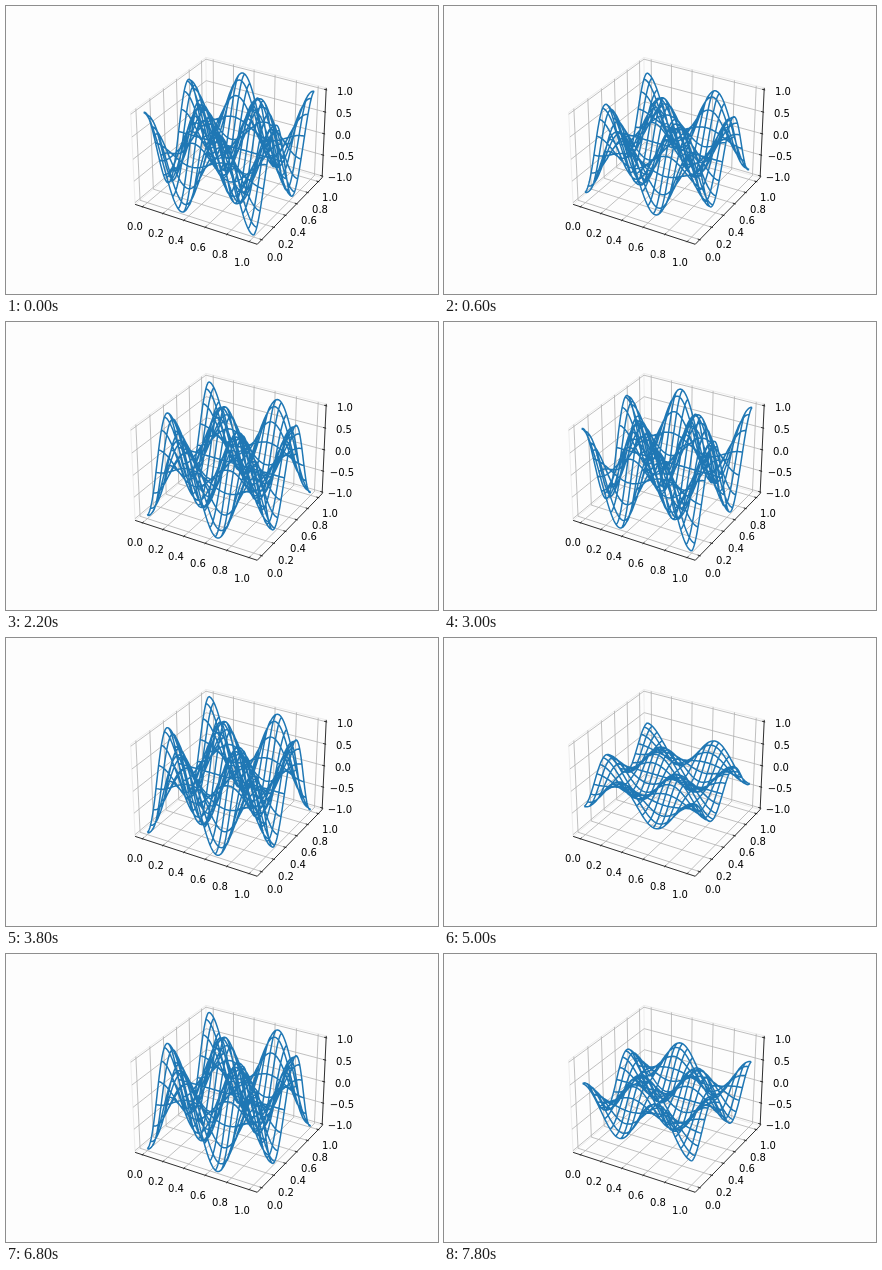
Animation of 432x288 px, one loop 8 s. Source, as an HTML page:

```html
<!DOCTYPE html>
<html lang="en">
<head>
<meta charset="utf-8">
<title>Standing wave</title>
<style>
  html, body { margin: 0; width: 100%; height: 100%; overflow: hidden; background: #fdfdfd; }
  svg { display: block; width: 432px; height: 288px; }
  path { fill: none; }
  .pane { stroke: #ededed; stroke-width: 1; }
  .grid { stroke: #b0b0b0; stroke-width: .8; }
  .axis { stroke: #000; stroke-width: .8; }
  .wire { stroke: #1f77b4; stroke-width: 1.5; stroke-linejoin: round; }
  text { font: 10px "DejaVu Sans", sans-serif; text-anchor: middle; fill: #000; }
</style>
</head>
<body>
<svg viewBox="0 0 432 288"></svg>
<script>
const svg = document.querySelector('svg');
const STEP = 200, STEPS = 40, OMEGA = 0.8325;
const LINES = 20, SAMPLES = 100;
const ELEV = Math.PI / 6, AZIM = -Math.PI / 3, DIST = 10;
const SCALE = 1175.35, CX = 224.34, CY = 140.34;
const [ce, se, ca, sa] = [Math.cos(ELEV), Math.sin(ELEV), Math.cos(AZIM), Math.sin(AZIM)];

// Perspective view of a box whose sides run from -0.5 to 0.5
function project([a, b, c]) {
  const x = a * 8 / 7, y = b * 8 / 7, z = c * 6 / 7;
  const depth = DIST - (ce * ca * x + ce * sa * y + se * z);
  const right = -sa * x + ca * y;
  const up = -se * ca * x - se * sa * y + ce * z;
  return [CX + SCALE * right / depth, CY - SCALE * up / depth];
}

const polyline = points =>
  'M' + points.map(p => project(p).map(v => v.toFixed(2)).join(' ')).join('L');

function add(tag, attributes) {
  const node = document.createElementNS('http://www.w3.org/2000/svg', tag);
  for (const key in attributes) node.setAttribute(key, attributes[key]);
  return svg.appendChild(node);
}
const draw = (cls, ...points) => add('path', { class: cls, d: polyline(points) });

const plane = v => (v + 0.05) / 1.1 - 0.5;
const E = 0.5 + 1 / 48;
const DELTA = 1 / 12, LABEL = E + 1.2693 * DELTA;

function label(point, value) {
  const [x, y] = project(point);
  const text = add('text', { x: Math.round(x), y: Math.round(y + 7.5) });
  text.textContent = value.toFixed(1).replace('-', '\u2212');
}

const unitTicks = [0, 1, 2, 3, 4, 5].map(i => i / 5);
const axes = [
  {
    values: unitTicks, place: plane,
    line: [[-E, -E, -E], [E, -E, -E]],
    grid: p => [[p, -E, -E], [p, E, -E], [p, E, E]],
    tick: (p, s) => [p, -E - s, -E],
    label: p => [p, -LABEL, -LABEL]
  },
  {
    values: unitTicks, place: plane,
    line: [[E, -E, -E], [E, E, -E]],
    grid: p => [[E, p, -E], [-E, p, -E], [-E, p, E]],
    tick: (p, s) => [E + s, p, -E],
    label: p => [LABEL, p, -LABEL]
  },
  {
    values: [-1, -0.5, 0, 0.5, 1], place: v => v / 2,
    line: [[E, E, -E], [E, E, E]],
    grid: p => [[-E, -E, p], [-E, E, p], [E, E, p]],
    tick: (p, s) => [E + s, E, p],
    label: p => [LABEL, LABEL, p]
  }
];

draw('pane', [-E, -E, -E], [-E, E, -E], [-E, E, E], [-E, -E, E], [-E, -E, -E]);
draw('pane', [-E, E, -E], [E, E, -E], [E, E, E], [-E, E, E]);
draw('pane', [-E, -E, -E], [E, -E, -E], [E, E, -E]);

for (const axis of axes) {
  draw('axis', ...axis.line);
  const places = axis.values.map(axis.place);
  places.forEach(p => draw('grid', ...axis.grid(p)));
  places.forEach((p, i) => {
    draw('axis', axis.tick(p, 0.1 * DELTA), axis.tick(p, -0.2 * DELTA));
    label(axis.label(p), axis.values[i]);
  });
}

const wire = add('path', { class: 'wire' });
const wave = v => Math.cos(3 * Math.PI * v);

function surface(amplitude) {
  const point = (x, y) => [plane(x), plane(y), amplitude * wave(x) * wave(y) / 2];
  let d = '';
  for (let i = 0; i <= LINES; i++) {
    const along = [], across = [];
    for (let j = 0; j <= SAMPLES; j++) {
      along.push(point(j / SAMPLES, i / LINES));
      across.push(point(i / LINES, j / SAMPLES));
    }
    d += polyline(along) + polyline(across);
  }
  return d;
}

let shown = -1;
const start = performance.now();
function render() {
  const elapsed = Math.max(0, performance.now() - start);
  const step = Math.floor(elapsed / STEP) % STEPS;
  if (step !== shown) {
    shown = step;
    wire.setAttribute('d', surface(Math.cos(OMEGA * step)));
  }
  requestAnimationFrame(render);
}
render();
</script>
</body>
</html>
```
